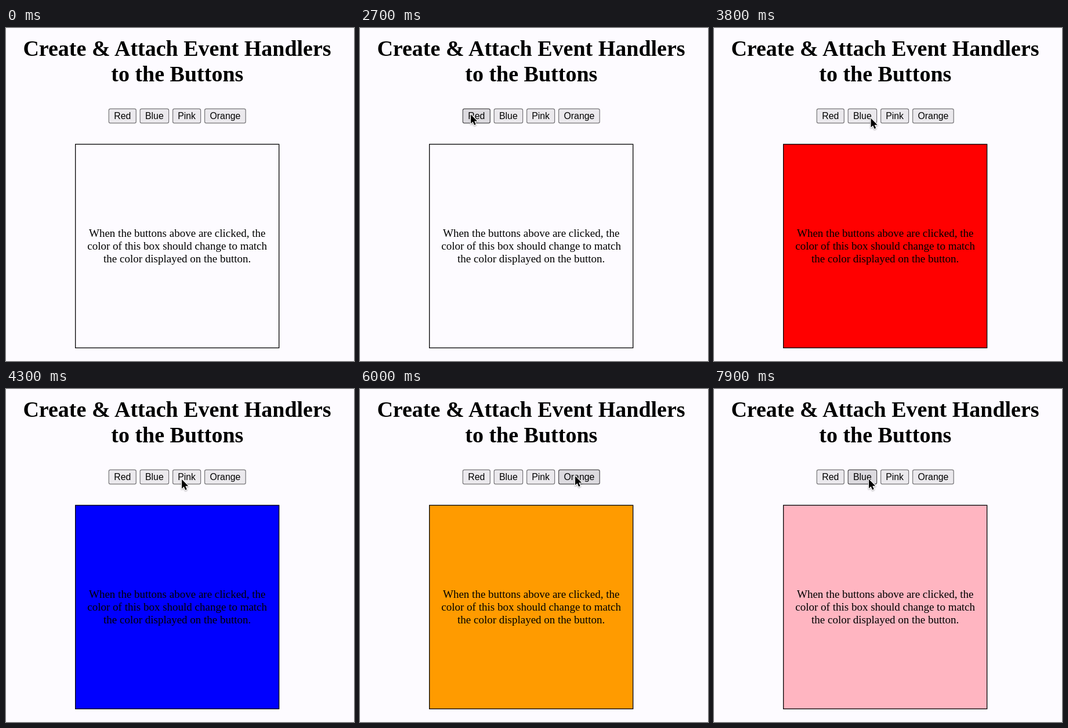
Write an HTML page that moves like this. It is 600x574 px and loops after 8 s.

```html
<!DOCTYPE html>
<html lang="en">
<head>
<meta charset="utf-8">
<title>Event Handlers</title>
<style>
  html, body { margin: 0; width: 100%; height: 100%; overflow: hidden; background: #fdfbff; }
  svg { display: block; width: 600px; height: 574px; }
  text { text-anchor: middle; fill: #000; }
  .title { font: bold 38px "Liberation Serif", "Times New Roman", serif; }
  .note { font: 19px "Liberation Serif", "Times New Roman", serif; }
  .button text { font: 15.83px "Liberation Sans", Arial, sans-serif; }
  .button rect { fill: #ebe9ed; stroke: #757477; stroke-width: 1.2; }
  .button.pressed rect { fill: #dcdadf; stroke: #4b4a4d; }
  #box { stroke: #000; stroke-width: 1.3; }
  #cursor { filter: drop-shadow(0 1.2px 1.2px rgba(0, 0, 0, .35)); }
  #cursor path { fill: #000; stroke: #fff; stroke-width: 2.4; stroke-linejoin: round; paint-order: stroke; }
</style>
</head>
<body>
<svg viewBox="0 0 600 574">
  <g class="title">
    <text x="295" y="48">Create &amp; Attach Event Handlers</text>
    <text x="295.3" y="92">to the Buttons</text>
  </g>
  <g class="button" id="red">
    <rect x="177.3" y="139.4" width="47" height="24.4" rx="2.6"/>
    <text x="200.8" y="157">Red</text>
  </g>
  <g class="button" id="blue">
    <rect x="231.2" y="139.4" width="49.4" height="24.4" rx="2.6"/>
    <text x="255.9" y="157">Blue</text>
  </g>
  <g class="button" id="pink">
    <rect x="287.6" y="139.4" width="48" height="24.4" rx="2.6"/>
    <text x="311.6" y="157">Pink</text>
  </g>
  <g class="button" id="orange">
    <rect x="342.6" y="139.4" width="70.6" height="24.4" rx="2.6"/>
    <text x="377.9" y="157">Orange</text>
  </g>
  <rect id="box" x="119.7" y="200.4" width="351" height="351" fill="none"/>
  <g class="note">
    <text x="295.2" y="360">When the buttons above are clicked, the</text>
    <text x="295.2" y="382">color of this box should change to match</text>
    <text x="295.2" y="404">the color displayed on the button.</text>
  </g>
  <g id="cursor"><path d="M0 0V15.8L3.6 12.4L6.1 18.2L8.7 17.1L6.2 11.4H11.2Z"/></g>
</svg>
<script>
const LOOP = 8000, STEP = 100;
const ENTER = 700;
const colors = { red: '#ff0000', blue: '#0000ff', pink: '#ffb5c1', orange: '#ff9b00' };

// The box takes its colour 200 ms after the press; the button is let go 100 ms later.
const clicks = [
  { at: 2700, name: 'red' },
  { at: 3900, name: 'blue' },
  { at: 4800, name: 'pink' },
  { at: 5800, name: 'orange' },
  { at: 6800, name: 'pink' },
  { at: 7800, name: 'blue' }
];

const easeOut = p => 1 - (1 - p) ** 2;
const easeInOut = p => p * p * (3 - 2 * p);

const moves = [
  { from: 700, to: 1400, x: 191, y: 149, ease: easeOut },
  { from: 2900, to: 3800, x: 270.5, y: 155.5, ease: easeInOut },
  { from: 4100, to: 4400, x: 314.5, y: 156, ease: easeInOut },
  { from: 5000, to: 5700, x: 371, y: 150, ease: easeInOut },
  { from: 6000, to: 6700, x: 314.5, y: 155, ease: easeInOut },
  { from: 7000, to: 7700, x: 267, y: 155.5, ease: easeInOut }
];

const el = id => document.getElementById(id);
const box = el('box'), cursor = el('cursor');

function cursorAt(t) {
  let x = 40, y = 31;
  for (const m of moves) {
    if (t <= m.from) break;
    const k = m.ease(Math.min(1, (t - m.from) / (m.to - m.from)));
    x += (m.x - x) * k;
    y += (m.y - y) * k;
  }
  return [x, y];
}

function draw(t) {
  let fill = 'none', pressed = '';
  for (const c of clicks) {
    if (t >= c.at + 200) fill = colors[c.name];
    if (t >= c.at && t < c.at + 300) pressed = c.name;
  }
  box.setAttribute('fill', fill);
  for (const name in colors) el(name).classList.toggle('pressed', name === pressed);
  cursor.style.visibility = t < ENTER ? 'hidden' : 'visible';
  cursor.setAttribute('transform', `translate(${cursorAt(t)})`);
}

const start = performance.now();
function tick() {
  const t = (performance.now() - start) % LOOP;
  draw(Math.floor(t / STEP) * STEP);
  requestAnimationFrame(tick);
}
draw(0);
requestAnimationFrame(tick);
</script>
</body>
</html>
```
